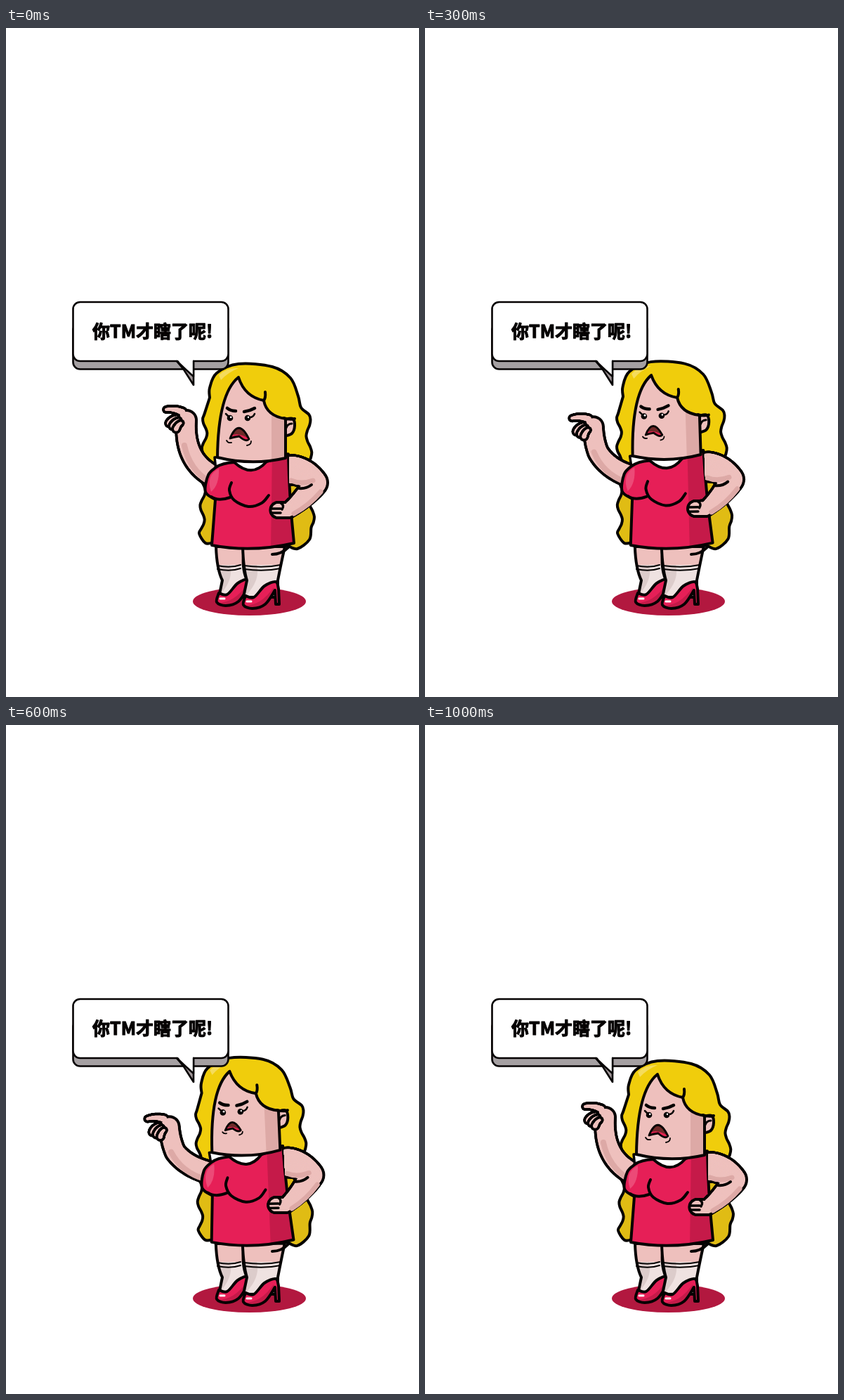
Recreate the animation shown at these times as an HTML page with a canvas. Size 588x952 px, loop 1100 ms.

```html
<!DOCTYPE html>
<html lang="zh">
<head>
<meta charset="utf-8">
<style>
html, body { margin: 0; width: 100%; height: 100%; overflow: hidden; background: #fff; }
canvas { display: block; }
</style>
</head>
<body>
<canvas id="stage" width="588" height="952"></canvas>
<script>
const ctx = document.getElementById('stage').getContext('2d');
const INK = '#050202', SKIN = '#eec0bd', SKIN_DARK = '#dda9a6', HAIR = '#f0cd0c', HAIR_DARK = '#e0bc14',
  RED = '#e61f57', RED_DARK = '#c51a49', SOCK = '#efe2e1', SOCK_DARK = '#dccccb';
const STEP = 100, STEPS = 11;
let lean = 0;

const clamp = v => Math.max(0, Math.min(1, v));
const mix = (a, b, t) => a + (b - a) * t;

// Out and back in even steps, soft at the start.
function leanAt(ms) {
  const k = Math.floor(ms / STEP) % STEPS;
  const e = Math.min(k, STEPS - 1 - k) / 5;
  return 1.23 * mix(e, e * e * (3 - 2 * e), .5) ** 1.15;
}

// Upper body bends to the left; the feet stay put.
function body([x, y]) {
  const t = clamp((742 - y) / 130);
  const dx = -7.5 * t - .043 * Math.max(0, 612 - y);
  const dy = -.0445 * (x - 240) * t;
  return [x + dx * lean, y + dy * lean];
}

// Pointing arm swings, blending into the body at the shoulder.
function swing([x, y]) {
  const w = clamp(Math.hypot(x - 300, y - 640) / 60);
  const [bx, by] = body([x, y]);
  return [mix(bx, x + .15 * (y - 718) * lean, w), mix(by, y - .15 * (x - 343) * lean, w)];
}

// The mouth closes a little while leaning.
function mouth([x, y]) {
  return body([mix(x, 331, .18 * lean), mix(y, 570, .25 * lean)]);
}

// M, L, Q and Z as in SVG; R runs a smooth curve through its points.
function shape(d, warp = body) {
  const path = new Path2D();
  let pen;
  for (const [, cmd, rest] of d.matchAll(/([MLQRZ])([^MLQRZ]*)/g)) {
    if (cmd === 'Z') { path.closePath(); continue; }
    const n = (rest.match(/-?[\d.]+/g)).map(Number), p = [];
    for (let i = 0; i < n.length; i += 2) p.push(warp([n[i], n[i + 1]]));
    if (cmd === 'M') path.moveTo(...p[0]);
    if (cmd === 'L') p.forEach(q => path.lineTo(...q));
    if (cmd === 'Q') for (let i = 0; i < p.length; i += 2) path.quadraticCurveTo(...p[i], ...p[i + 1]);
    if (cmd === 'R') {
      const s = [pen, ...p];
      for (let i = 0; i < p.length; i++) {
        const a = s[i - 1] || s[i], b = s[i], c = s[i + 1], e = s[i + 2] || c;
        path.bezierCurveTo(b[0] + (c[0] - a[0]) / 6, b[1] + (c[1] - a[1]) / 6,
          c[0] - (e[0] - b[0]) / 6, c[1] - (e[1] - b[1]) / 6, ...c);
      }
    }
    pen = p.at(-1);
  }
  return path;
}

function line(d, width = 4, warp = body, color = INK) {
  ctx.strokeStyle = color;
  ctx.lineWidth = width;
  ctx.stroke(shape(d, warp));
}

// Filled outline with shading kept inside it.
function part(d, color, shades = [], width = 4, warp = body) {
  const path = shape(d, warp);
  ctx.fillStyle = color;
  ctx.fill(path);
  ctx.save();
  ctx.clip(path);
  for (const [s, c] of shades) {
    ctx.fillStyle = c;
    ctx.fill(shape(s, warp));
  }
  ctx.restore();
  if (width) line(d, width, warp);
}

function dot([x, y], r, color) {
  ctx.fillStyle = color;
  ctx.beginPath();
  ctx.arc(x, y, r, 0, 7);
  ctx.fill();
}

// Tapered round strokes that share one outline: [from, bend, to, r0, r1].
function limb(strokes, warp) {
  for (const [color, grow] of [[INK, 2], [SKIN, -2]])
    for (const [a, b, c, r0, r1] of strokes)
      for (let t = 0; t <= 1; t += 1 / 40) {
        const at = i => mix(mix(a[i], b[i], t), mix(b[i], c[i], t), t);
        dot(warp([at(0), at(1)]), mix(r0, r1, t) + grow, color);
      }
}

// Points down a wavy lock, first crest at the given place.
function wave(x, y, slope, amp, period, end) {
  const pts = [];
  for (let v = y - 8; v <= end; v += period / 6)
    pts.push([x + slope * (v - y) + amp * (Math.cos((v - y) / period * 2 * Math.PI) - 1), v]);
  return pts;
}

function hair() {
  const right = wave(433.5, 558, .04, 3.5, 46, 718);
  const left = wave(280, 557, -.03, -3.5, 41, 724).reverse();
  part(`M290 526 R290 512 300 491 331 478 379 482 405 498 416 524 420 540 ${right}
    432 728 415 741 402 737 L296 732 R284 733 ${left} 290 526 Z`, HAIR, [
    ['M404 625 L450 625 L450 745 L398 745 Z M265 665 L300 665 L300 740 L284 740 Z', HAIR_DARK],
    ['M303 494 Q314 483 331 484 Q316 490 306 501 Z', '#f5dc5c']
  ]);
}

function pointingArm() {
  limb([
    [[257, 558], [252, 618], [300, 640], 14, 16],
    [[228, 543], [240, 541], [252, 547], 4, 6]
  ], swing);
  line('M254 594 Q261 628 290 646', 8, swing, SKIN_DARK);
  for (let i = 0; i < 3; i++) {
    const x = 232 + 5 * i, y = 563 + 4 * i;
    limb([[[x + 11 - 2 * i, y - 9], [x + 3, y - 7], [x, y], 3.5, 5]], swing);
  }
}

function leg(x0, x1, ankle0, ankle1) {
  const side = `M${x0} 738 Q${x0 + 1} 770 ${ankle0} 786 L${ankle0 - 5} 810 L${ankle1} 810 L${ankle1} 786 Q${x1 - 6} 765 ${x1} 738 Z`;
  const mid = x0 + 20;
  part(side, SKIN, [
    [`M${x0} 764 L${x1} 764 L${x1 + 9} 812 L${x0} 812 Z`, SOCK],
    [`M${x0} 764 L${mid} 764 Q${mid + 6} 788 ${x0} 812 Z`, SOCK_DARK]
  ]);
  for (const y of [765, 770]) line(`M${x0 + 2} ${y} Q${(x0 + x1) / 2} ${y + 4} ${x1 - 6} ${y - 1}`, 2);
}

function shoe(dx, dy) {
  const place = ([x, y]) => [x + dx, y + dy];
  part(`M341 808 R353 810 368 794 384 788 388 798 L389 820 L384 820 L383 800
    R369 820 351 826 338 821 341 808 Z`, RED, [
    ['M335 822 Q362 824 381 796 L390 830 L335 830 Z', RED_DARK]
  ], 4, place);
  line('M343 816 L349 816', 3, place, '#fff');
}

function legs() {
  leg(299, 340, 308, 343);
  shoe(-38, -4);
  leg(337, 397, 343, 387);
  line('M379 749 Q392 749 402 739');
  shoe(0, 0);
}

function dress() {
  part('M297 611 L402 606 L375 635 L299 629 Z', '#fff', [], 3.5);
  part(`M299 625 Q308 619 325 618 Q350 641 371 617 L402 607 Q403 665 410 733
    Q350 747 293 736 L298 671 R284 660 288 636 299 625 Z`, RED, [
    ['M379 600 L415 600 L415 745 L377 745 Z', RED_DARK],
    ['M303 627 Q284 636 292 660 Q304 650 303 627 Z', '#ec4a77']
  ]);
  line('M292 667 Q302 674 319 668');
  line('M321 647 R318 658 325 672 345 681 364 676 374 665');
}

function hipArm() {
  ctx.save();
  ctx.clip(shape('M403 590 L500 590 L500 760 L360 760 L360 668 L403 668 Z'));
  limb([
    [[407, 629], [426, 630], [440, 647], 21, 18],
    [[440, 647], [428, 667], [402, 686], 18, 11],
    [[402, 686], [395, 686], [387, 686], 11, 11]
  ], body);
  line('M406 644 Q420 650 437 644', 7, body, SKIN_DARK);
  line('M448 660 Q432 679 410 691', 7, body, SKIN_DARK);
  line('M417 655 Q427 656 435 650');
  for (const y of [684, 690]) line(`M378 ${y} L391 ${y}`, 3.5);
  line('M391 676 Q397 679 393 685', 3.5);
  ctx.restore();
}

function head() {
  part('M397 557 R408 556 411 566 407 577 396 581 Z', SKIN);
  part(`M331 497 Q302 520 301 611 Q350 623 398 612 L398 556 Q371 552 367 530 Q340 525 331 497 Z`, SKIN, [
    ['M378 535 L402 535 L402 620 L378 620 Z', SKIN_DARK]
  ]);
  line('M367 530 Q370 526 369 518');
  line('M396 555 Q404 558 411 556');
  line('M399 569 Q401 563 407 563', 3);
}

function face() {
  line('M315 541 Q320 545 327 545 M339 546 Q347 545 354 541', 4.5);
  for (const x of [319, 344]) {
    dot(body([x, 555]), 4.3, INK);
    dot(body([x + 1.2, 553.8]), 1.4, '#fff');
  }
  line('M313 549 L317 553 M347 554 Q352 554 354 549', 2.5);
  part('M319 584 Q331 554 346 585 Q342 590 332 581 Q324 582 319 584 Z', '#6f2a29', [
    ['M317 581 Q333 573 350 588 L318 592 Z', '#e32150']
  ], 2.8, mouth);
  line('M314 587 Q316 591 321 590 M343 594 Q349 593 349 588', 1.8, mouth);
}

function box(y, h, color) {
  const path = new Path2D();
  path.roundRect(95.5, y, 221, h, 10);
  ctx.fillStyle = color;
  ctx.fill(path);
  ctx.strokeStyle = INK;
  ctx.lineWidth = 2.6;
  ctx.stroke(path);
}

function bubble() {
  const fixed = p => p;
  box(420, 65.5, '#a5a0a2');
  part('M243 474 L253 486 L267 508 L267 474 Z', '#a09698', [], 2.6, fixed);
  box(390, 84, '#fff');
  part('M244 472 L266 495 L266 472 Z', '#fff', [], 0, fixed);
  line('M243 474 L267 496 L267 474', 2.4, fixed);
  ctx.fillStyle = INK;
  ctx.font = '900 25px "Noto Sans CJK SC", "Noto Sans CJK", sans-serif';
  ctx.lineWidth = 1.1;
  ctx.fillText('你TM才瞎了呢!', 123, 441);
  ctx.strokeText('你TM才瞎了呢!', 123, 441);
}

function draw(ms) {
  lean = leanAt(ms);
  ctx.fillStyle = '#fff';
  ctx.fillRect(0, 0, 588, 952);
  ctx.lineCap = ctx.lineJoin = 'round';
  ctx.fillStyle = '#b2183f';
  ctx.beginPath();
  ctx.ellipse(346.5, 816, 80.5, 20, 0, 0, 7);
  ctx.fill();
  [hair, pointingArm, legs, dress, hipArm, head, face, bubble].forEach(f => f());
}

const start = performance.now();
function tick() {
  draw(performance.now() - start);
  requestAnimationFrame(tick);
}
tick();
</script>
</body>
</html>
```
